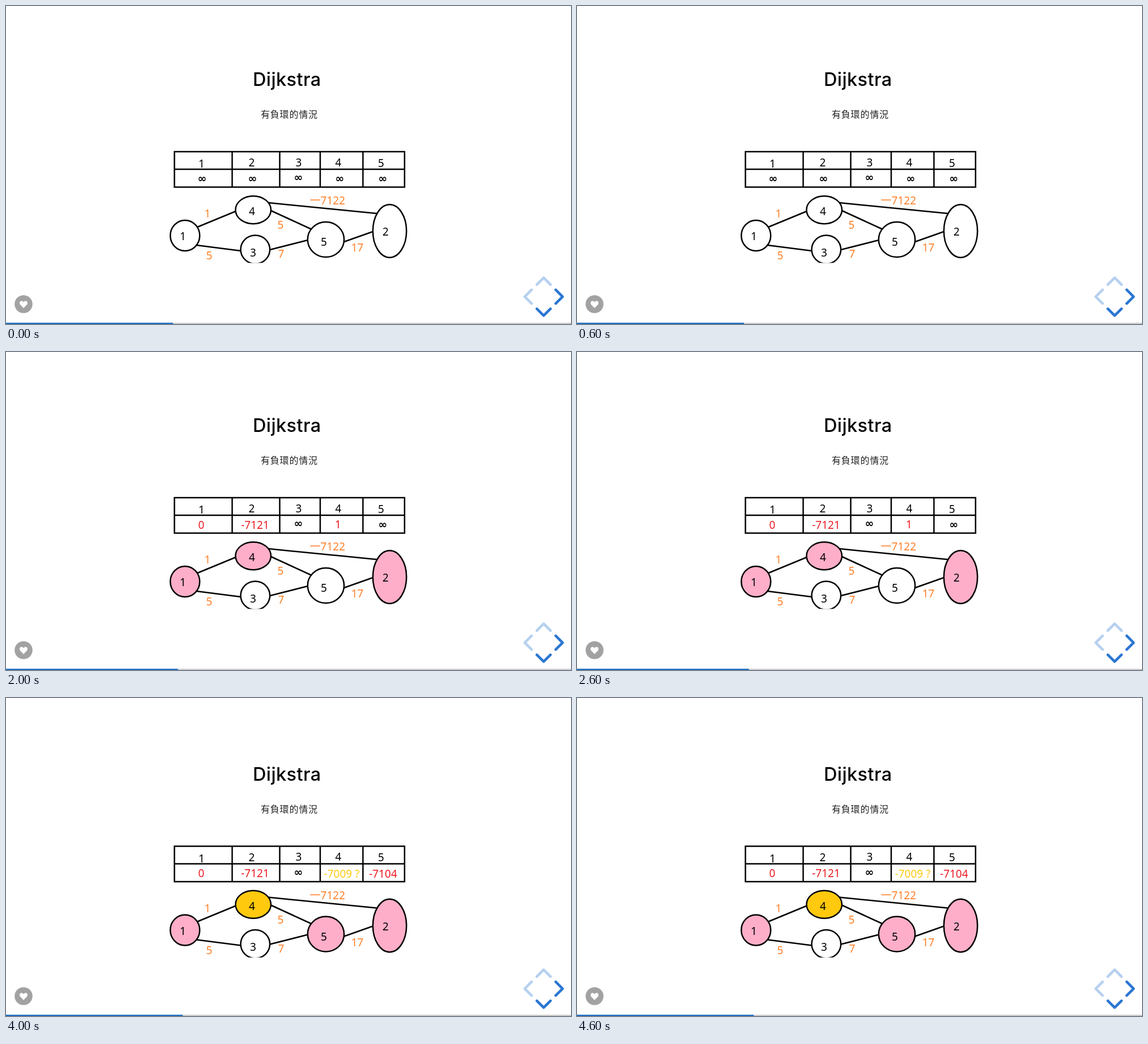
An HTML page for the animation above (5 s loop, 998 by 561 pixels).

```html
<!DOCTYPE html>
<html lang="zh-Hant">
<head>
<meta charset="utf-8">
<title>Dijkstra</title>
<style>
  html, body { margin: 0; width: 100%; height: 100%; overflow: hidden; background: #fff; }
  svg { display: block; width: 998px; height: 561px; }
  .title { font: 500 32.5px Inter, sans-serif; letter-spacing: .4px; }
  .subtitle { font: 300 16px "Noto Sans CJK TC", "Noto Sans CJK", sans-serif; letter-spacing: .8px; fill: #222; }
  .num { font: 19px "Noto Sans", "Open Sans", "Noto Sans CJK TC", sans-serif; text-anchor: middle; }
  .inf { font: bold 19px "DejaVu Sans", sans-serif; text-anchor: middle; }
  .ink { fill: none; stroke: #000; stroke-width: 2.5; }
  .arrow { fill: none; stroke: #2a76d2; stroke-width: 4.6; stroke-linecap: round; stroke-linejoin: round; }
</style>
</head>
<body>
<svg viewBox="0 0 998 561">
  <defs><clipPath id="crop"><rect x="280" y="240" width="440" height="213.3"/></clipPath></defs>
  <g id="slide">
    <text class="title" x="436" y="141">Dijkstra</text>
    <text class="subtitle" x="450" y="197">有負環的情況</text>
    <g id="figure" clip-path="url(#crop)">
      <path class="ink" d="M297.5 257H704V319.5H297.5ZM297.5 288H704M399.5 257V319.5M483.5 257V319.5M555 257V319.5M630.5 257V319.5"/>
      <path class="ink" d="M338 390L406 362M337 422L415 432M463 347L655 366M468 361L540 394M466 430L533 413M597 416L648 398"/>
    </g>
  </g>
  <circle cx="31" cy="526" r="15.8" fill="#a2a2a2"/>
  <path fill="#fff" d="M31 533L25 526.8C23.2 524.8 23.8 520.3 27.4 520.3C29.2 520.3 30.4 521.4 31 522.6C31.6 521.4 32.8 520.3 34.6 520.3C38.2 520.3 38.8 524.8 37 526.8Z"/>
  <g id="arrows"></g>
  <rect y="558.8" width="998" height="2.2" fill="#ccc"/>
  <rect id="progress" y="558.8" height="2.2" fill="#1b6ec2"/>
</svg>
<script>
const PINK = '#ffaec9', RED = '#ed1c24', ORANGE = '#ff7f27', YELLOW = '#ffc90e';
const STEP = 1000, STEPS = 5;
const $ = id => document.getElementById(id);

function add(parent, tag, attrs, text = '') {
  const el = document.createElementNS('http://www.w3.org/2000/svg', tag);
  for (const key in attrs) el.setAttribute(key, attrs[key]);
  el.textContent = text;
  return parent.appendChild(el);
}
const figure = $('figure');
const label = (text, x, y, fill = '#000') =>
  add(figure, 'text', { class: 'num', x, y: y + 7, fill }, text);

// [name, cx, cy, rx, ry, label x, label y, fill changes by step]
const nodes = [
  ['1', 316.2, 405, 26, 27, 312.5, 406, { 1: PINK }],
  ['2', 677.7, 397, 29.7, 46.7, 670.5, 398, { 2: PINK }],
  ['3', 440.3, 429.6, 25.8, 25.1, 436.5, 434.5, {}],
  ['4', 436.7, 359.7, 31.3, 24.5, 434.5, 362, { 1: PINK, 4: YELLOW }],
  ['5', 565, 412, 32.2, 31, 561.5, 416, { 3: PINK }],
].map(([name, cx, cy, rx, ry, x, y, fills]) => {
  const el = add(figure, 'ellipse', { class: 'ink', cx, cy, rx, ry });
  label(name, x, y);
  return { el, fills };
});

[['1', 356, 366], ['5', 359, 440], ['5', 485, 386], ['7', 486, 437], ['17', 620.5, 426], ['一7122', 567.8, 343]]
  .forEach(([text, x, y]) => label(text, x, y, ORANGE));

[[345.5, 278], [434, 276], [517, 275.5], [587, 275.5], [662.5, 276.5]]
  .forEach(([x, y], i) => label(i + 1, x, y));

// [x, y of the infinity sign, value changes by step as [text, x, y, colour]]
const cells = [
  [346.5, 305, { 1: ['0', 345, 304.5, RED] }],
  [435.5, 305, { 2: ['-7121', 440, 304.5, RED] }],
  [516.5, 303, {}],
  [589.5, 305, { 1: ['1', 586.5, 304, RED], 4: ['-7009 ?', 593, 305.3, YELLOW] }],
  [665.5, 305, { 3: ['-7104', 666, 305, RED] }],
].map(([x, y, values]) => ({
  inf: add(figure, 'text', { class: 'inf', x, y: y + 6 }, '∞'),
  el: label('', x, y),
  values,
}));

[180, 270, 0, 90].forEach((angle, i) => add($('arrows'), 'path', {
  class: 'arrow', d: 'M21.3 -12.1L33.4 0L21.3 12.1',
  transform: `translate(949.7 512.8) rotate(${angle})`, opacity: i < 2 ? .34 : 1,
}));

// Latest change that has happened by the given step.
function latest(changes, step) {
  for (let i = step; i >= 0; i--) if (changes[i]) return changes[i];
}

function render(time) {
  const step = Math.floor(time / STEP) % STEPS;
  for (const { el, fills } of nodes) el.style.fill = latest(fills, step) || '#fff';
  for (const { inf, el, values } of cells) {
    const value = latest(values, step);
    inf.style.display = value ? 'none' : '';
    const [text, x, y, fill] = value || ['', 0, 0, RED];
    el.textContent = text;
    el.setAttribute('x', x);
    el.setAttribute('y', y + 7);
    el.setAttribute('fill', fill);
  }
  $('slide').setAttribute('transform', `translate(0 ${[0, 0, 0, 3.5, 4.5][step]})`);
  $('progress').setAttribute('width', 295 + 4.3 * step);
}

const start = performance.now();
function tick() {
  render(performance.now() - start);
  requestAnimationFrame(tick);
}
tick();
</script>
</body>
</html>
```
